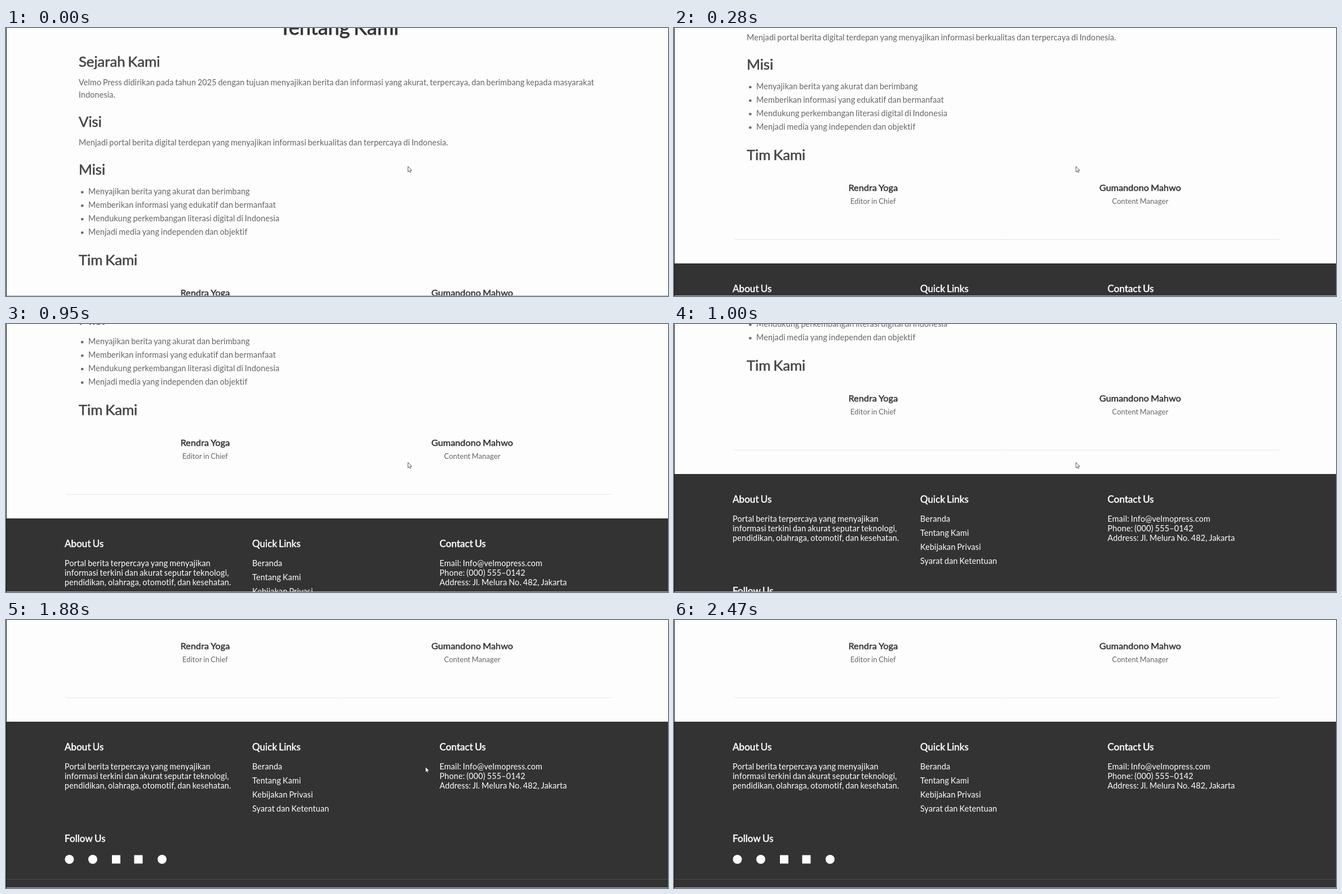
Write an HTML page with a canvas that moves like this. It is 1175x477 px and loops after 3820 ms.

```html
<!DOCTYPE html>
<html lang="id">
<head>
<meta charset="utf-8">
<title>Tentang Kami</title>
<style>
  html, body { margin: 0; width: 100%; height: 100%; overflow: hidden; background: #fdfdfd; }
  canvas { display: block; }
</style>
</head>
<body>
<canvas id="stage" width="1175" height="477"></canvas>
<script>
const W = 1175, H = 477, LOOP = 3820;
const ctx = document.getElementById('stage').getContext('2d');

const styles = {
  title:  { size: 36,    color: '#333', bold: 0.8 },
  h2:     { size: 25.92, color: '#444', bold: 0.55, spacing: -0.004 },
  body:   { size: 14.4,  color: '#666', spacing: 0.007 },
  name:   { size: 16.2,  color: '#333', bold: 0.5, spacing: 0.004 },
  role:   { size: 12.96, color: '#666', spacing: 0.006 },
  footH:  { size: 17,    color: '#fff', bold: 0.5, spacing: 0.004 },
  footer: { size: 14.4,  color: '#fff', spacing: 0.011 }
};

function text(str, x, y, style, align = 'left') {
  const { size, color, bold = 0, spacing = 0 } = styles[style];
  ctx.font = `${size}px Lato, "Open Sans", sans-serif`;
  ctx.letterSpacing = `${size * spacing}px`;
  ctx.wordSpacing = `${size * -0.07}px`;
  ctx.textAlign = align;
  ctx.fillStyle = ctx.strokeStyle = color;
  ctx.fillText(str, x, y);
  if (bold) {
    ctx.lineWidth = bold;
    ctx.lineJoin = 'round';
    ctx.strokeText(str, x, y);
  }
}

function lines(list, x, y, gap, style) {
  list.forEach((str, i) => text(str, x, Math.round(y + i * gap), style));
}

function rect(x, y, w, h, color) {
  ctx.fillStyle = color;
  ctx.fillRect(x, y, w, h);
}

function dot(x, y, r, color) {
  ctx.fillStyle = color;
  ctx.beginPath();
  ctx.arc(x, y, r, 0, Math.PI * 2);
  ctx.fill();
}

function drawArticle() {
  text('Tentang Kami', 591, 12, 'title', 'center');

  text('Sejarah Kami', 129, 69, 'h2');
  lines([
    'Velmo Press didirikan pada tahun 2025 dengan tujuan menyajikan berita dan informasi yang akurat, terpercaya, dan berimbang kepada masyarakat',
    'Indonesia.'
  ], 129, 102, 21.6, 'body');

  text('Visi', 129, 176, 'h2');
  text('Menjadi portal berita digital terdepan yang menyajikan informasi berkualitas dan terpercaya di Indonesia.', 129, 209, 'body');

  text('Misi', 129, 261, 'h2');
  lines([
    'Menyajikan berita yang akurat dan berimbang',
    'Memberikan informasi yang edukatif dan bermanfaat',
    'Mendukung perkembangan literasi digital di Indonesia',
    'Menjadi media yang independen dan objektif'
  ], 146, 296, 24, 'body');
  for (let i = 0; i < 4; i++) dot(135.3, 292.3 + i * 24, 2.3, '#666');

  text('Tim Kami', 129, 422, 'h2');
  text('Rendra Yoga', 353.5, 477, 'name', 'center');
  text('Editor in Chief', 353.5, 500, 'role', 'center');
  text('Gumandono Mahwo', 827.5, 477, 'name', 'center');
  text('Content Manager', 827.5, 500, 'role', 'center');

  // bottom edge of the card
  ctx.strokeStyle = '#e6e6e6';
  ctx.lineWidth = 1;
  ctx.beginPath();
  ctx.moveTo(105.5, 561);
  ctx.quadraticCurveTo(106.5, 563.5, 110, 563.5);
  ctx.lineTo(1071, 563.5);
  ctx.quadraticCurveTo(1074.5, 563.5, 1075.5, 561);
  ctx.stroke();
}

function drawFooter() {
  rect(0, 606, W, 400, '#333');

  text('About Us', 104, 657, 'footH');
  lines([
    'Portal berita terpercaya yang menyajikan',
    'informasi terkini dan akurat seputar teknologi,',
    'pendidikan, olahraga, otomotif, dan kesehatan.'
  ], 104, 691, 17, 'footer');

  text('Quick Links', 437, 657, 'footH');
  lines(['Beranda', 'Tentang Kami', 'Kebijakan Privasi', 'Syarat dan Ketentuan'], 437, 691, 25.1, 'footer');

  text('Contact Us', 769.5, 657, 'footH');
  lines([
    'Email: Info@velmopress.com',
    'Phone: (000) 555–0142',
    'Address: Jl. Melura No. 482, Jakarta'
  ], 769.5, 691, 17, 'footer');

  text('Follow Us', 104, 820, 'footH');
  for (const x of [112.5, 154, 277]) dot(x, 851, 8, '#fff');
  for (const x of [195.5, 235]) rect(x - 7.5, 843.5, 15, 15, '#fff');

  rect(0, 886, W, 1, '#4c4c4c');
}

function drawCursor(x, y) {
  const arrow = [[0, 0], [0, 9.6], [2.3, 7.6], [3.7, 10.7], [5.2, 10], [3.9, 7], [6.8, 6.8]];
  ctx.beginPath();
  arrow.forEach(([dx, dy]) => ctx.lineTo(x + 0.5 + dx, y + 0.5 + dy));
  ctx.closePath();
  ctx.fillStyle = '#fff';
  ctx.fill();
  ctx.strokeStyle = '#333';
  ctx.lineWidth = 0.8;
  ctx.stroke();
}

// Each wheel scroll eases over 220 ms but is shown only at its ticks.
const scrolls = [
  { start: 59.3,  distance: 187, ticks: [90, 140, 190, 230, 280] },
  { start: 869.3, distance: 238, ticks: [900, 950, 1000, 1060, 1100] }
];

function scrollAt(t) {
  return scrolls.reduce((sum, { start, distance, ticks }) => {
    const tick = ticks.filter(k => k <= t).pop();
    if (tick === undefined) return sum;
    const p = Math.min(1, (tick - start) / 220);
    return sum + Math.round(distance * p * p * (3 - 2 * p));
  }, 0);
}

// time, x, y of the pointer sweep
const sweep = [
  [1880, 744, 261], [1920, 789, 313], [1960, 900, 352], [2035, 1146, 409],
  [2110, 1060, 383], [2200, 880, 330], [2300, 773, 299]
];

function cursorAt(t) {
  if (t >= 2470) return null;
  if (t < 1880) return [713, 246];
  const step = 420 / 11;
  const tick = Math.min(2300, 1880 + Math.floor((t - 1880) / step) * step);
  const i = Math.max(1, sweep.findIndex(k => k[0] >= tick));
  const [t0, x0, y0] = sweep[i - 1], [t1, x1, y1] = sweep[i];
  const p = (tick - t0) / (t1 - t0);
  return [Math.round(x0 + (x1 - x0) * p), Math.round(y0 + (y1 - y0) * p)];
}

function draw() {
  const t = performance.now() % LOOP;
  rect(0, 0, W, H, '#fdfdfd');
  ctx.save();
  ctx.translate(0, -scrollAt(t));
  drawArticle();
  drawFooter();
  ctx.restore();
  rect(0, H - 1, W, 1, '#b4b4b4');
  rect(0, 0, 1, H, '#111');
  const cursor = cursorAt(t);
  if (cursor) drawCursor(...cursor);
  requestAnimationFrame(draw);
}
draw();
</script>
</body>
</html>
```
